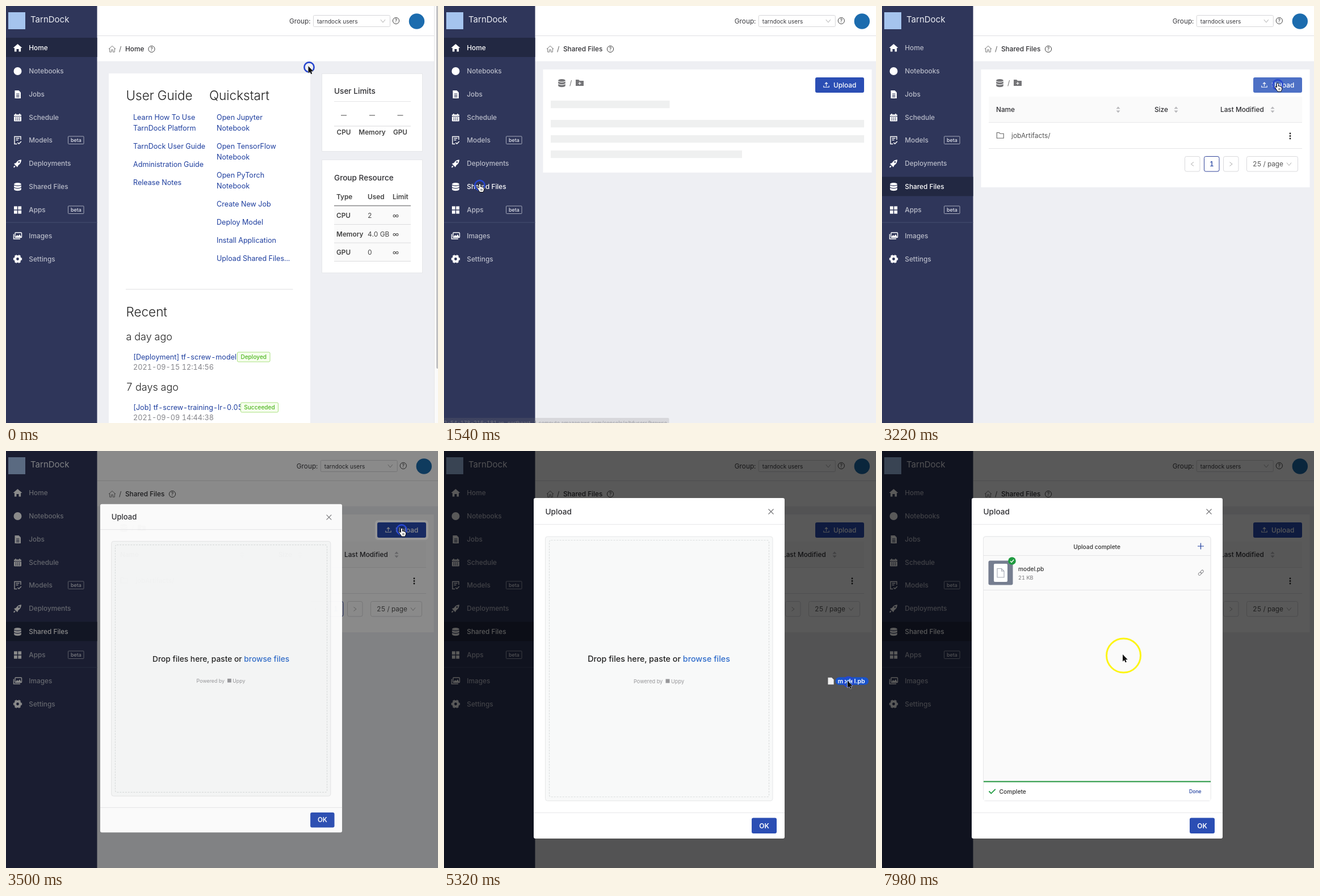
Recreate the animation shown at these times as an HTML page. Size 761 by 736 pixels, loop 8 s.

```html
<!DOCTYPE html>
<html lang="en">
<head>
<meta charset="utf-8">
<title>Shared files upload</title>
<style>
html, body { margin: 0; width: 100%; height: 100%; overflow: hidden; background: #eeeff3; }
svg { display: block; width: 761px; height: 736px; font-family: Inter, "Open Sans", sans-serif; font-variant-numeric: tabular-nums; }
text { white-space: pre; }
</style>
</head>
<body>
<script>
const BLUE = '#2b4eb4', LINK = '#1f3f9f', DARK = '#2f2f33', NAVY = '#2f365a';

// Markup helpers
const text = (x, y, s, size, fill = DARK, weight = 400, anchor = 'start') =>
  `<text x="${x}" y="${y}" font-size="${size}" fill="${fill}" font-weight="${weight}" text-anchor="${anchor}">${s}</text>`;
const rect = (x, y, w, h, fill, stroke = 'none', r = 0, extra = '') =>
  `<rect x="${x}" y="${y}" width="${w}" height="${h}" fill="${fill}" stroke="${stroke}" rx="${r}" ${extra}/>`;
const path = (d, stroke, w = 1, fill = 'none', extra = '') =>
  `<path d="${d}" stroke="${stroke}" stroke-width="${w}" fill="${fill}" ${extra}/>`;
const disc = (x, y, r, fill, stroke = 'none', w = 1) =>
  `<circle cx="${x}" cy="${y}" r="${r}" fill="${fill}" stroke="${stroke}" stroke-width="${w}"/>`;
const rule = (x1, x2, y, stroke = '#e4e4e6', w = 1) => path(`M${x1} ${y}H${x2}`, stroke, w);
const group = (id, body, extra = '') => `<g id="${id}" ${extra}>${body}</g>`;
const at = (x, y, body) => `<g transform="translate(${x} ${y})">${body}</g>`;
const help = (x, y) => disc(x, y, 5.6, 'none', '#444', 1) + text(x, y + 3, '?', 8.5, '#444', 500, 'middle');
const chevron = (x, y) => path(`M${x - 4} ${y - 2.5}L${x} ${y + 2.5} ${x + 4} ${y - 2.5}`, '#aaa', 1);

// Icons, centred on 0,0
const stack = (fill, gap) => path('M-6.3 -4.5C-6.3 -8 6.3 -8 6.3 -4.5V4.5C6.3 8 -6.3 8 -6.3 4.5Z', 'none', 0, fill) +
  path('M-6.5 -3.2Q0 0 6.5 -3.2M-6.5 1.2Q0 4.4 6.5 1.2', gap, 1.2);
const icons = {
  home: path('M-8 0L0 -7 8 0H5.6V6.5H2V2H-2V6.5H-5.6V0Z', 'none', 0, '#fff'),
  round: disc(0, 0, 7, '#fff'),
  page: path('M-5 -7H2L5.5 -3.5V7H-5Z', 'none', 0, '#fff') + path('M-2.5 -1H3M-2.5 1.7H3M-2.5 4.4H3', NAVY, 1.2),
  calendar: rect(-6.5, -5.5, 13, 12, '#fff', 'none', 1) + path('M-3.5 -7V-4M3.5 -7V-4', '#fff', 1.6) +
    path('M-6.5 -2.2H6.5', NAVY, 1) + path('M-4 .8H4.5M-4 3.8H4.5', NAVY, 1.6, 'none', 'stroke-dasharray="1.8 1.4"'),
  model: path('M5.5 -1V-6.5H-5.5V6.5H-1M-3 -3.5H3M-3 -.5H1', '#fff', 1.4) + path('M0 4L2.2 6.2 6.4 2', '#fff', 1.4),
  rocket: path('M6.5 -6.8Q0 -6.5 -3 -1L-6.5 .2 -4.5 2.5 -2.5 4.5 -.5 6.6 1 3.2Q6.4 0 6.5 -6.8Z', 'none', 0, '#fff') +
    disc(2.4, -2.6, 1.4, NAVY) + path('M-6.8 6.8L-4.6 4.4', '#fff', 2),
  files: stack('#fff', NAVY),
  apps: [[-6.5, -6.5], [.8, -6.5], [-6.5, .8], [.8, .8]].map(p => rect(...p, 5.8, 5.8, '#fff')).join(''),
  images: rect(-4.5, -5.5, 11.5, 8.5, 'none', '#fff', 1, 'stroke-width="1.4"') +
    path('M-7 -3V5.5H4.5', '#fff', 1.4) + path('M-4 2.5L-1 -1.5 1 .5 3.5 -2.5 6.5 2.5Z', 'none', 0, '#fff'),
  gear: disc(0, 0, 4.4, 'none', '#fff', 4) + path('M-7.6 0H-6M7.6 0H6M-3.8 -6.6L-3 -5.2M3.8 6.6L3 5.2M3.8 -6.6L3 -5.2M-3.8 6.6L-3 5.2', '#fff', 4)
};

const items = [
  ['Home', 74, 'home'], ['Notebooks', 115, 'round'], ['Jobs', 156, 'page'], ['Schedule', 197, 'calendar'],
  ['Models', 237, 'model', 1], ['Deployments', 278, 'rocket'], ['Shared Files', 319, 'files'],
  ['Apps', 360, 'apps', 1], ['Images', 405.5, 'images'], ['Settings', 446.5, 'gear']
];

function sidebar() {
  const rows = items.map(([name, y, icon, beta], i) =>
    at(20.5, y, icons[icon]) +
    `<g id="item${i}" fill="#b9bcc9">` + text(40.3, y + 4.2, name, 11.8, 'inherit', 500).replace('fill="inherit"', '') + '</g>' +
    (beta ? rect(109.5, y - 7, 27.5, 13.5, 'none', '#a5a9ba', 1) + text(123.4, y + 2.8, 'beta', 8.8, '#e4e6ee', 500, 'middle') : ''));
  return rect(0, 0, 160.5, 736, NAVY) + rect(0, 56, 160.5, 34, '#222842', 'none', 0, 'id="active"') +
    rect(4, 11, 30, 30, '#a5c4ee') + text(43, 29, 'TarnDock', 15, '#eceef4', 400) +
    rows.join('') + rule(0, 160.5, 382, '#474e70');
}

function topbar() {
  return rect(160.5, 0, 601, 97.5, '#fff') + rule(160.5, 761, 52.5, '#e0e0e3') +
    group('account',
      text(499, 31, 'Group:', 11.8, '#3c3c40') + rect(541.5, 16.5, 135, 20, '#fff', '#d5d5d8', 2) +
      text(548, 30.5, 'tarndock users', 10.1, '#3c3c40') + chevron(664, 26.5) + help(687, 26) + disc(723.5, 27, 13.7, '#1c6cae')) +
    at(187, 76, path('M-6 0L0 -5.5 6 0M-4.3 -1V5.2H-1.3V1.2H1.3V5.2H4.3V-1', '#777', 1)) +
    text(199, 80, '/', 12, '#555');
}

const list = (x, rows) => rows.map(([y, s]) => text(x, y, s, 12.6, LINK)).join('');

function homePage() {
  const recent = (y, name, date, tx, tw, tag) =>
    text(224, y, name, 12.6, LINK) + text(224, y + 18.8, date, 12.7, '#85858a') +
    rect(tx, y - 12.5, tw, 17, '#f6ffed', '#a9e080', 2) + text(tx + tw / 2, y - .4, tag, 10.1, '#4fb522', 500, 'middle');
  const bold = (x, y, s, anchor) => text(x, y, s, 11.8, '#444', 600, anchor);
  const cells = [['CPU', 374, '2'], ['Memory', 406.5, '4.0 GB'], ['GPU', 439, '0']];
  return text(210, 80, 'Home', 11.8, DARK, 500) + help(256.5, 76) +
    rect(181, 119, 355, 617, '#fff') +
    text(211.5, 166, 'User Guide', 22.5, '#222', 300) + text(358, 166, 'Quickstart', 22.5, '#222', 300) +
    list(224, [[201, 'Learn How To Use'], [220, 'TarnDock Platform'], [252, 'TarnDock User Guide'], [284, 'Administration Guide'], [315.5, 'Release Notes']]) +
    list(371, [[201, 'Open Jupyter'], [220, 'Notebook'], [252, 'Open TensorFlow'], [271, 'Notebook'], [303, 'Open PyTorch'], [322, 'Notebook'],
      [354, 'Create New Job'], [386, 'Deploy Model'], [417.5, 'Install Application'], [450, 'Upload Shared Files...']]) +
    rule(211, 505.5, 500, '#dedee0') +
    text(211.5, 548, 'Recent', 22.5, '#222', 300) +
    text(211.5, 590, 'a day ago', 18, '#222', 300) + text(211.5, 679, '7 days ago', 18, '#222', 300) +
    recent(623.5, '[Deployment] tf-screw-model', '2021-09-15 12:14:56', 407.5, 57.5, 'Deployed') +
    recent(712.5, '[Job] tf-screw-training-lr-0.05', '2021-09-09 14:44:38', 413.5, 66, 'Succeeded') +
    rect(556.5, 119.5, 177, 137, '#fff', '#e6e7ea') + rect(556.5, 271.5, 177, 199.5, '#fff', '#e6e7ea') +
    text(578, 155, 'User Limits', 13.6, DARK, 500) + rule(578, 713, 168.5) + rule(578, 713, 212, '#d8d8da') +
    [[595, 'CPU'], [645, 'Memory'], [694.5, 'GPU']].map(([x, s]) => rule(x - 5, x + 5, 193, '#444') + bold(x, 227, s, 'middle')).join('') +
    text(578, 308, 'Group Resource', 13.6, DARK, 500) +
    rect(578, 353, 135, 97, '#fafafa') + bold(582, 341, 'Type') + bold(637, 341, 'Used') + bold(681, 341, 'Limit') +
    rule(578, 713, 352.5, '#8a8a8c', 1.4) +
    cells.map(([s, y, used]) => bold(582, y, s) + text(637, y, used, 11.8, '#444') + text(681, y, '∞', 11.8, '#444') + rule(578, 713, y + 11.5, '#dcdcde')).join('') +
    rect(754.5, -1, 8, 738, '#fafafa', '#e6e6e8') + rect(758, -4, 6, 644, '#c1c1c3', 'none', 2);
}

function sharedPage() {
  const sorter = x => path(`M${x - 3.5} 181.5L${x} 177.5 ${x + 3.5} 181.5ZM${x - 3.5} 184.5L${x} 188.5 ${x + 3.5} 184.5Z`, 'none', 0, '#b8b8bb');
  const head = (x, s, sx) => text(x, 187, s, 11.8, DARK, 500) + sorter(sx);
  const box = (x, w, stroke = '#d9d9dc') => rect(x, 265.5, w, 26.5, '#fff', stroke, 3);
  return text(210, 80, 'Shared Files', 11.8, DARK, 500) + help(293, 76) +
    rect(174.5, 112, 579, 182, '#fff', 'none', 0, 'id="card"') +
    at(207.5, 136, stack('#757578', '#fff')) + text(221, 140, '/', 12, '#666') +
    at(239, 135.5, path('M-7 -5.5H-2L0 -3.5H7V5.5H-7Z', 'none', 0, '#757578') + path('M-2.5 1H2.5M0 -1.5V3.5', '#fff', 1.2)) +
    rect(654, 126, 86, 27, BLUE, 'none', 3, 'id="button"') +
    path('M673.5 141.5V135.3M671 137.6L673.5 135 676 137.6M668.8 140.5V143.3H678.2V140.5', '#fff', 1.1) +
    text(686, 143.5, 'Upload', 11.8, '#fff', 500) +
    group('skeleton', [[167, 209.5], [201, 552], [228, 552], [255, 337]].map(([y, w]) => rect(188, y, w, 13.3, '#eff0f0')).join('')) +
    group('table',
      rect(188, 160, 552, 45, '#fafafa') + rule(188, 740, 205.5, '#e8e8ea') +
      head(201, 'Name', 416) + head(480, 'Size', 518) + head(596, 'Last Modified', 688) +
      path('M202.3 223.5H206.5L208 225.2H214.2V233.2H202.3Z', '#666', 1.1) + text(228, 233, 'jobArtifacts/', 11.9, '#555') +
      [225, 229.5, 234].map(y => disc(719, y, 1.4, '#222')).join('') + rule(188, 740, 251.5, '#e4e4e6') +
      box(533.5, 26.5) + box(567.5, 26.5, '#32459a') + box(601.5, 26.5) + box(642.5, 90) +
      path('M549 275.5L544.5 279 549 282.5M612.5 275.5L617 279 612.5 282.5', '#aaa', 1) +
      text(580.8, 283.3, '1', 11.8, LINK, 500, 'middle') + text(653, 283.3, '25 / page', 11.8, '#555') + chevron(717, 279));
}

function modal() {
  const dashed = (stroke, dash) => rect(185.5, 157.5, 387, 453, 'none', stroke, 3, `stroke-dasharray="${dash}" stroke-width="1.2"`);
  return rect(158, 83, 442, 601, '#fff', 'none', 3) +
    text(178.5, 111.5, 'Upload', 13.6, DARK, 500) + path('M571.5 102.5L580.5 111.5M580.5 102.5L571.5 111.5', '#77777a', 1.2) +
    rule(158, 600, 129.5, '#e8e8ea') + rule(158, 600, 638.5, '#e8e8ea') +
    rect(542, 647.5, 44, 27.5, BLUE, 'none', 3) + text(564, 665.5, 'OK', 11.9, '#fff', 600, 'middle') +
    rect(178.5, 151, 400.5, 466.5, '#f8f9f9', '#e6e7e8', 4) +
    group('prompt', text(378.6, 372, 'Drop files here, paste or <tspan fill="#2f6ccb">browse files</tspan>', 14.3, '#222', 500, 'middle') +
      text(334, 410, 'Powered by', 9.2, '#97979a') + rect(390.5, 402.5, 7, 7, '#97979a') + text(400, 410, 'Uppy', 9.2, '#97979a')) +
    group('idle', dashed('#dcdfdf', '3 2')) +
    group('drop', dashed('#2f5c9c', '2 3') + disc(378.8, 384, 19.7, '#fafafa', '#1f5fcb', 1.8) +
      path('M378.8 393V375.5M372.5 381.5L378.8 375 385.1 381.5', '#1f5fcb', 1.8) +
      text(378.6, 427, 'Drop your files here', 13.4, '#66666a', 400, 'middle')) +
    group('result',
      rect(178.5, 151, 400.5, 466.5, '#fafafa', '#e6e7e8', 4) + rule(179, 579, 184.5) + rule(179, 579, 245.5) +
      path('M556 168H567M561.5 162.5V173.5', LINK, 1.2) +
      rect(187.5, 193.5, 43, 43, '#767e90', 'none', 3) + rect(197, 199, 24, 32, '#fff', 'none', 2) +
      path('M203 207.5H210.5L215 212V223H203ZM210.5 207.5V212H215', '#a3a7b2', 1.1) +
      text(240, 211.5, 'model.pb', 10.2, '#333', 500) + text(240, 227, '21 KB', 9.2, '#77777a') +
      at(561.8, 214.8, `<g transform="rotate(-45)">${rect(-5.6, -2, 6, 4, 'none', '#88888c', 2)}${rect(-.4, -2, 6, 4, 'none', '#88888c', 2)}</g>`) +
      rect(179, 584, 399.5, 33, '#fff') + rect(179, 582.5, 400, 2, BLUE, 'none', 0, 'id="progress"') +
      group('done', text(378.6, 172.5, 'Upload complete', 10.2, '#333', 500, 'middle') +
        disc(229, 194, 6.8, '#1f9b40') + path('M226 194.2L228.2 196.4 232.2 191.8', '#fff', 1.4) +
        path('M188.5 600.5L192.3 604.3 199.8 596.8', '#1f9b40', 1.8) +
        text(206.5, 604.5, 'Complete', 10.3, '#333', 500) + text(541, 604, 'Done', 8.6, LINK, 500)));
}

const cursor =
  group('ring', disc(0, 0, 30, 'none', '#fdf514', 3)) + group('press', disc(0, 0, 8.6, 'none', '#2746cf', 2.6)) +
  group('arrow', path('M-1.5 -2V10.5L1.4 7.9 3.3 12.2 5.3 11.3 3.5 7.2H7.3Z', '#fff', 1, '#111', 'paint-order="stroke"')) +
  group('hand', path('M0 12L-4.5 5Q-5 2.4 -3.2 3L-1.5 5V-1.5Q-1.5 -3 0 -3T1.5 -1.5V2.5Q3 1.8 4 3 5.5 2.5 6 4 7.5 4 7.5 5.5V8L6 12Z', '#111', 1, '#fff') +
    path('M2 6V9.5M4 6V9.5', '#111', .8)) +
  group('plus', disc(6.5, 18, 8, '#357c2d', '#e8efe6', 1) + path('M2.5 18H10.5M6.5 14V22', '#fff', 1.8));

const host = 'ec2-54-178-216-181.ap-northeast-1.compute.amazonaws.com/console/g/tdusers/browse';

document.body.innerHTML = `<svg viewBox="0 0 761 736">${
  rect(0, 0, 761, 736, '#eeeff3') + topbar() + group('homePage', homePage()) + group('sharedPage', sharedPage()) + sidebar() +
  group('status', rect(-2, 727, 398.5, 12, 'rgba(120,120,120,.2)', 'none', 2) + text(393, 738.5, host, 9, 'rgba(135,135,140,.75)', 400, 'end')) +
  rect(0, 0, 761, 736, '#000', 'none', 0, 'id="mask"') +
  rect(652, 124, 90, 31, 'none', '#fff', 4, 'id="wave" stroke-width="4" opacity=".12"') +
  group('modal', modal()) +
  group('drag', path('M-42.5 -6H-36L-32.5 -2.5V6H-42.5Z', '#bbb', .6, '#f0f0f0') + rect(-29.5, -6.8, 58.5, 13.6, '#1953cb', 'none', 6.8) +
    text(-25.5, 3.8, 'model.pb', 10.7, '#fff', 600)) +
  group('cursor', cursor)}</svg>`;

const $ = id => document.getElementById(id);
const show = (id, on) => $(id).setAttribute('display', on ? 'inline' : 'none');
const set = (id, name, value) => $(id).setAttribute(name, value);

const moves = [
  [0, 532.5, 106], [140, 532.5, 106], [1120, 61.5, 314.5], [2100, 61.5, 314.5], [3080, 695.5, 137], [3640, 695.5, 137],
  [4200, 800, 330], [5180, 800, 330], [5320, 711, 405.5], [6440, 416.5, 352.5], [6720, 416.5, 352.5], [7700, 424, 359]
];
const dragMoves = [[5320, 719, 406], [6440, 429.5, 354]];
const opening = [[3360, .4, 0, 0], [3500, .964, .96, .46], [3640, 1, 1, .65]];

// Eased values between the two keys around t
function sample(keys, t) {
  const i = keys.findIndex(k => k[0] > t);
  if (i === 0) return keys[0].slice(1);
  if (i < 0) return keys[keys.length - 1].slice(1);
  const [a, b] = [keys[i - 1], keys[i]];
  const p = (t - a[0]) / (b[0] - a[0]), e = p * p * (3 - 2 * p);
  return a.slice(1).map((v, j) => v + (b[j + 1] - v) * e);
}

function draw(t) {
  const within = (a, b) => t >= a && t < b;
  const shared = t >= 1400, loaded = t >= 1820, active = t >= 1680 ? 6 : 0;
  show('homePage', !shared);
  show('sharedPage', shared);
  set('account', 'transform', `translate(${shared ? 12.8 : 0} 0)`);
  show('skeleton', !loaded);
  show('table', loaded);
  set('card', 'height', loaded ? 208 : 182);
  set('active', 'y', active ? 301.5 : 56);

  const [x, y] = sample(moves, t);
  items.forEach((item, i) => {
    const hover = t < 3640 && x < 160 && Math.abs(y + 2 - item[1]) < 17;
    set('item' + i, 'fill', i === active || hover ? '#fff' : '#b9bcc9');
  });
  const onButton = x > 654 && x < 740 && y > 124 && y < 151;
  set('button', 'fill', onButton && t < 3500 ? '#4d70c5' : BLUE);
  show('status', within(1120, 1680));

  const [scale, alpha, shade] = sample(opening, t);
  set('mask', 'opacity', shade);
  show('wave', within(3500, 3640));
  show('modal', alpha > 0);
  set('modal', 'opacity', alpha);
  set('modal', 'transform', `translate(379 383.5) scale(${scale}) translate(-379 -383.5)`);

  const dragging = within(5320, 6720), over = within(5320, 6860) && x < 573;
  show('drop', over);
  show('idle', !over);
  set('prompt', 'opacity', over ? .06 : 1);
  show('drag', dragging);
  set('drag', 'transform', `translate(${sample(dragMoves, t)})`);

  const done = t >= 7280;
  show('result', t >= 6860);
  show('done', done);
  set('progress', 'width', 400 * Math.min(1, Math.max(0, (t - 6860) / 420)));
  set('progress', 'fill', done ? '#23963f' : BLUE);

  const pressed = t < 140 || within(1260, 1680) || within(3220, 3640) || dragging;
  const hand = t < 3640 && (onButton || (x < 160 && t >= 1120));
  set('cursor', 'transform', `translate(${x + 1.5} ${y + 2})`);
  show('ring', !pressed);
  show('press', pressed);
  show('hand', hand);
  show('arrow', !hand);
  show('plus', dragging && over);
}

const start = performance.now(), STEP = 140, LOOP = 8000;
function tick() {
  const t = (performance.now() - start) % LOOP;
  draw(Math.floor(t / STEP) * STEP);
  requestAnimationFrame(tick);
}
tick();
</script>
</body>
</html>
```
